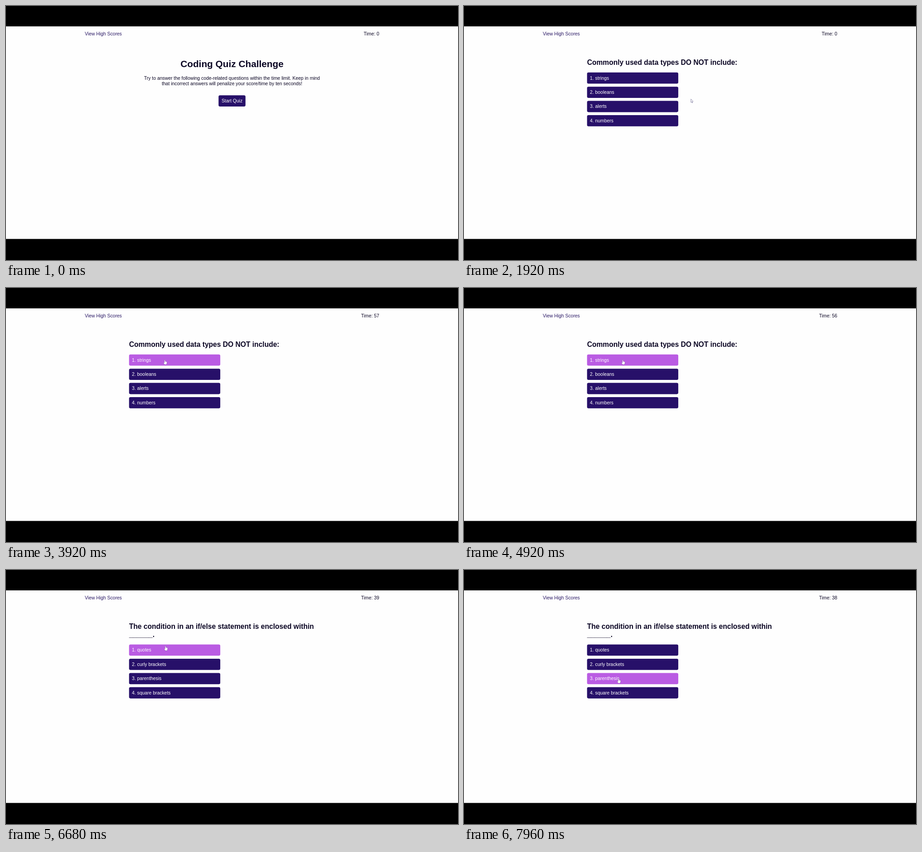
An HTML page with a canvas for the animation above (8000 ms loop, 998 px wide and 561 px high).

```html
<!DOCTYPE html>
<html lang="en">
<head>
<meta charset="utf-8">
<title>Coding Quiz Challenge</title>
<style>
html, body { margin: 0; width: 100%; height: 100%; overflow: hidden; background: #000; }
canvas { display: block; width: 998px; height: 561px; }
</style>
</head>
<body>
<canvas id="stage" width="998" height="561"></canvas>
<script>
const ctx = document.getElementById('stage').getContext('2d');
const LOOP = 8000;
const START_CLICK = 1400, ANSWER_CLICK = 4980, FEEDBACK_END = 6000;
const FIRST_TICK = 2370, PENALTY = 15;
const INK = '#0b0624', LINK = '#2b1a66', NAVY = '#271069', VIOLET = '#ba5ce3';
const FAMILY = '"Liberation Sans", Arial, sans-serif';

const questions = [
  { lines: ['Commonly used data types DO NOT include:'], top: 146.7,
    options: ['strings', 'booleans', 'alerts', 'numbers'] },
  { lines: ['The condition in an if/else statement is enclosed within', '______.'], top: 164.5,
    options: ['quotes', 'curly brackets', 'parenthesis', 'square brackets'] }
];

// Pointer path: time, x, y
const path = [
  [40, 640, 232], [800, 501, 205], [2300, 501, 205], [2600, 440, 190],
  [3000, 390, 248], [3300, 375, 225], [3600, 358, 185], [3850, 350.5, 158],
  [6580, 350.5, 158], [6680, 352, 167], [7150, 348, 250], [7400, 346, 274],
  [7840, 341, 239]
];

function pointerAt(t) {
  if (t < path[0][0]) return null;
  const i = path.findIndex(p => p[0] > t);
  if (i < 0) return { x: path[path.length - 1][1], y: path[path.length - 1][2] };
  const a = path[i - 1], b = path[i];
  const u = (t - a[0]) / (b[0] - a[0]), e = u * u * (3 - 2 * u);
  return { x: a[1] + (b[1] - a[1]) * e, y: a[2] + (b[2] - a[2]) * e };
}

function timeLeft(t) {
  if (t < FIRST_TICK) return 0;
  const ticks = Math.floor((t - FIRST_TICK) / 1000);
  return 58 - ticks - (ticks > 2 ? PENALTY : 0);
}

function text(str, x, y, color, size = 10.4, style = '', align = 'left') {
  ctx.font = `${style} ${size}px ${FAMILY}`;
  ctx.textAlign = align;
  ctx.fillStyle = color;
  ctx.fillText(str, x, y);
}

function button(x, y, w, h, hot, shadow) {
  ctx.save();
  if (shadow) {
    ctx.shadowColor = '#1a1030';
    ctx.shadowBlur = 3;
    ctx.shadowOffsetX = ctx.shadowOffsetY = 0.7;
  }
  ctx.fillStyle = hot ? VIOLET : NAVY;
  ctx.beginPath();
  ctx.roundRect(x, y, w, h, 3.3);
  ctx.fill();
  ctx.restore();
}

const inside = (p, x, y, w, h) =>
  !!p && p.x >= x && p.x <= x + w && p.y >= y && p.y <= y + h;

function drawIntro(p) {
  text('Coding Quiz Challenge', 499, 135.3, INK, 20.8, 'bold', 'center');
  text('Try to answer the following code-related questions within the time limit. Keep in mind',
    499, 162.8, INK, 10.4, '', 'center');
  text('that incorrect answers will penalize your score/time by ten seconds!',
    499, 174.7, INK, 10.4, '', 'center');
  const box = [469.3, 197.2, 59.5, 24.8];
  const hot = inside(p, ...box);
  button(...box, hot, hot);
  text('Start Quiz', 499, 212.8, '#fff', 10.4, '', 'center');
  return hot;
}

function drawQuestion(q, p) {
  q.lines.forEach((line, i) => text(line, 271.7, 130 + i * 18, INK, 15.6, 'bold'));
  let any = false;
  q.options.forEach((label, i) => {
    const y = q.top + i * 31.45;
    const hot = inside(p, 271.7, y, 201.4, 24.8);
    any = any || hot;
    button(271.7, y, 201.4, 24.8, hot, false);
    text(`${i + 1}. ${label}`, 278, y + 15.8, '#fff');
  });
  return any;
}

function drawFeedback() {
  ctx.fillStyle = '#d6d5da';
  ctx.fillRect(271.7, 294, 456, 1);
  text('Wrong!', 271.7, 307, '#b5b1c3', 10.4, 'italic');
}

function outline(points, fill, stroke) {
  ctx.beginPath();
  points.forEach(([x, y]) => ctx.lineTo(x, y));
  ctx.closePath();
  ctx.lineJoin = 'round';
  ctx.lineWidth = 0.8;
  ctx.fillStyle = fill;
  ctx.strokeStyle = stroke;
  ctx.fill();
  ctx.stroke();
}

function drawPointer(p, hand) {
  ctx.save();
  ctx.translate(p.x, p.y);
  if (hand) {
    outline([[-0.6, 0.3], [0.7, 0.3], [1, 4], [4.4, 4.8], [5, 6], [4.4, 9.2], [3.7, 11],
      [-0.4, 11], [-2.8, 7.2], [-2.4, 6.3], [-0.8, 7.2]], '#fff', 'rgba(70,40,110,.45)');
  } else {
    outline([[0, 0.5], [0, 8], [1.7, 6.5], [2.8, 9], [3.9, 8.5], [2.9, 6.1], [5, 5.7]],
      '#fff', '#77739a');
  }
  ctx.restore();
}

function draw(t) {
  ctx.fillStyle = '#000';
  ctx.fillRect(0, 0, 998, 561);
  ctx.fillStyle = '#fefefe';
  ctx.fillRect(0, 45, 998, 469.5);

  text('View High Scores', 174, 64.6, LINK);
  text('Time: ' + timeLeft(t), 824, 64.6, INK, 10.4, '', 'right');

  const p = pointerAt(t);
  const hot = t < START_CLICK ? drawIntro(p)
    : drawQuestion(questions[t < ANSWER_CLICK ? 0 : 1], p);
  if (t >= ANSWER_CLICK && t < FEEDBACK_END) drawFeedback();
  if (p) drawPointer(p, hot);
}

const begin = performance.now();
function frame() {
  draw((performance.now() - begin) % LOOP);
  requestAnimationFrame(frame);
}
frame();
</script>
</body>
</html>
```
